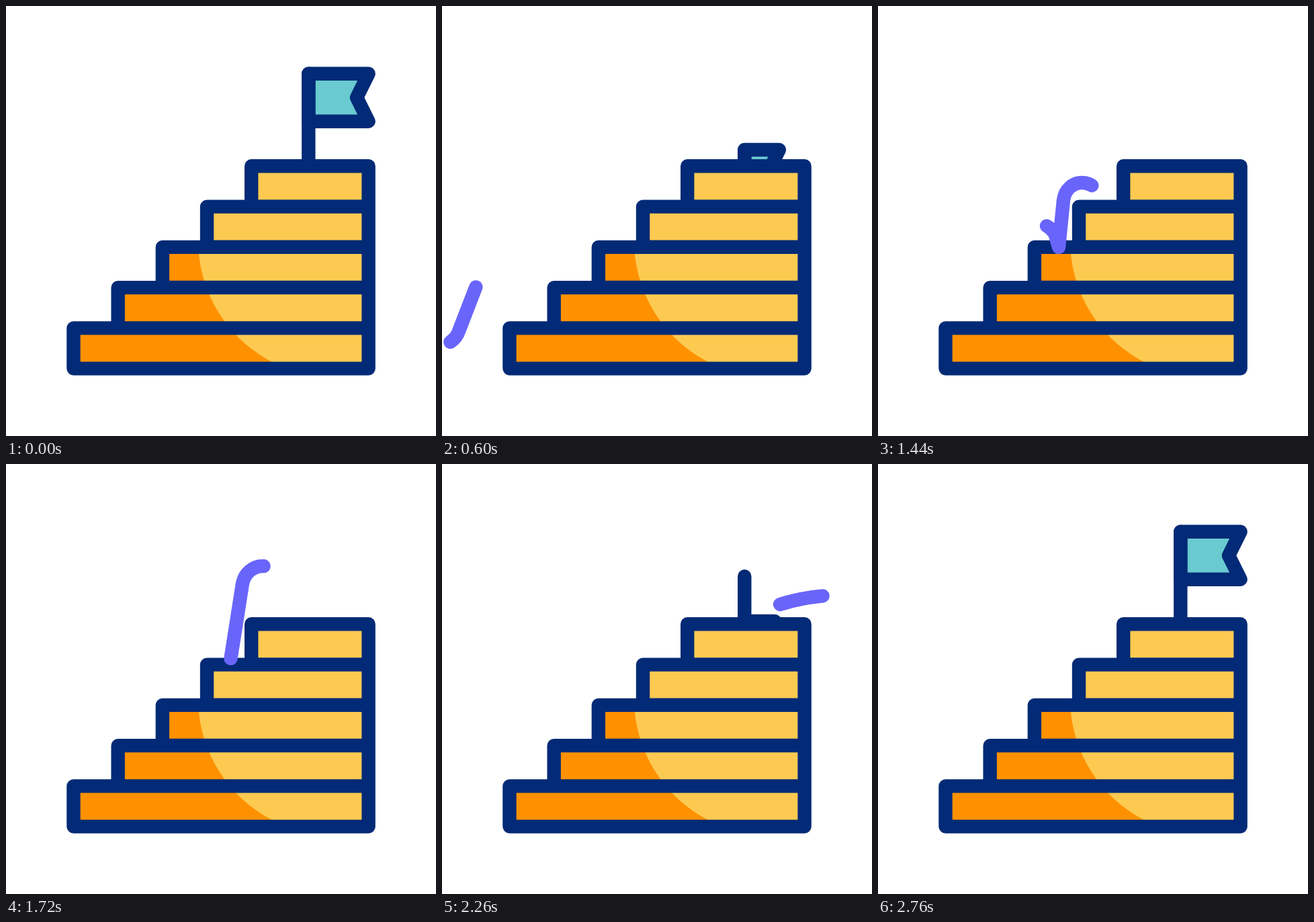
An HTML page that plays this animation: 640x640 px, repeating every 3.6 s.

```html
<!DOCTYPE html>
<html lang="en">
<head>
<meta charset="utf-8">
<title>Steps to the flag</title>
<style>
  html, body { margin: 0; height: 100%; overflow: hidden; background: #fff; }
  svg { display: block; width: 100vw; height: 100vh; }
  .line { stroke: #032a76; stroke-width: 20.4; stroke-linecap: round; stroke-linejoin: round; }
  #trail { fill: none; stroke: #6a65fa; stroke-width: 20.4; stroke-linecap: round; stroke-linejoin: round; }
</style>
</head>
<body>
<svg viewBox="0 0 640 640">
  <defs>
    <clipPath id="above"><rect width="640" height="229"/></clipPath>
    <clipPath id="inside"><path id="area"/></clipPath>
  </defs>
  <g clip-path="url(#above)">
    <path id="flag" class="line" fill="#69cad0"/>
    <path id="pole" class="line"/>
  </g>
  <g clip-path="url(#inside)">
    <rect width="640" height="640" fill="#ff9100"/>
    <circle cx="489.5" cy="349" r="203.5" fill="#fdca51"/>
  </g>
  <path id="stairs" class="line" fill="none"/>
  <path id="trail"/>
</svg>
<script>
const LOOP = 3600;
const HIDDEN = 150;
const $ = id => document.getElementById(id);
const smooth = (t, start, span) => {
  const u = Math.min(1, Math.max(0, (t - start) / span));
  return u * u * (3 - 2 * u);
};

// Staircase: five boxes sharing the right edge
let boxes = '';
for (let i = 0; i < 5; i++) {
  const x = 100.5 + 66.18 * i, y = 479.4 - 60.27 * i;
  boxes += `M${x},${y}H539.6V${y + 60.2}H${x}Z`;
}
$('stairs').setAttribute('d', boxes);
$('area').setAttribute('d', boxes);

// Bouncing trail: in from the left, three equal hops, a high hop, out to the right
const hop = 'l7,-70c2,-16 14,-26 28,-26c11,0 21,7 26,17';
const trail = $('trail');
trail.setAttribute('d',
  'M-40,512C-10,512 18,505 25,484L54,409C58,398 69,390 83,390C97,390 108,397 113,409L134,480' +
  hop + 'L203,420' + hop + 'L269,359' + hop + 'L333,299' +
  'L352,178C355,163 367,152 382,152C394,152 404,161 410,171L450,238' +
  'C470,218 520,194 617,194');

const total = trail.getTotalLength();
function lengthAt(x, y) {
  let best = 0, min = Infinity;
  for (let s = 0; s <= total; s += 0.5) {
    const p = trail.getPointAtLength(s);
    const d = Math.hypot(p.x - x, p.y - y);
    if (d < min) { min = d; best = s; }
  }
  return best;
}

// Each stop: time, x, y
const toKeys = stops => stops.map(([t, x, y]) => [t, lengthAt(x, y)]);
const head = toKeys([
  [110, -40, 512], [350, -3, 507], [600, 50, 419], [1080, 205, 408], [1640, 351.5, 185],
  [1720, 382, 152], [2060, 503, 208], [2180, 547, 199], [2520, 614, 194], [2600, 617, 194]
]);
const tail = toKeys([
  [320, -40, 512], [600, 12, 500], [1080, 136, 455], [1720, 334, 291],
  [2060, 429, 204], [2520, 609, 194], [2600, 617, 194]
]);

// Smooth curve through the keys
function follow(keys, t) {
  const last = keys.length - 1;
  if (t <= keys[0][0]) return keys[0][1];
  if (t >= keys[last][0]) return keys[last][1];
  let i = 0;
  while (t > keys[i + 1][0]) i++;
  const slope = k => k === 0 || k === last ? 0
    : (keys[k + 1][1] - keys[k - 1][1]) / (keys[k + 1][0] - keys[k - 1][0]);
  const [t0, a] = keys[i], [t1, b] = keys[i + 1];
  const span = t1 - t0, u = (t - t0) / span, v = 1 - u;
  return a * v * v * (1 + 2 * u) + b * u * u * (3 - 2 * u)
    + span * u * v * (slope(i) * v - slope(i + 1) * u);
}

function drawFlag(t) {
  let flagDrop, poleDrop;
  if (t < 1900) {
    flagDrop = Math.min(HIDDEN, 105 * Math.pow(Math.max(0, t - 20) / 570, 3.9));
    poleDrop = flagDrop;
  } else {
    poleDrop = 137.4 * (1 - smooth(t, 1931, 645));
    flagDrop = HIDDEN * (1 - smooth(t, 2132, 618));
  }
  const y = 100.8 + flagDrop, fold = flagDrop / 3;
  const tip = 539.6 - fold, notch = 522 - fold;
  $('flag').setAttribute('d',
    `M450.3,${y}H${tip}L${notch},${y + 35.4}L${tip},${y + 70.9}H450.3Z`);
  $('pole').setAttribute('d', `M450.3,${100.8 + poleDrop}V260`);
}

function drawTrail(t) {
  const from = follow(tail, t), to = follow(head, t);
  const visible = to > 0 && from < total - 1;
  trail.style.display = visible ? '' : 'none';
  trail.setAttribute('stroke-dasharray', `${Math.max(0.1, to - from)} 9999`);
  trail.setAttribute('stroke-dashoffset', -from);
}

const begin = performance.now();
function draw() {
  const t = (performance.now() - begin) % LOOP;
  drawFlag(t);
  drawTrail(t);
  requestAnimationFrame(draw);
}
draw();
</script>
</body>
</html>
```
